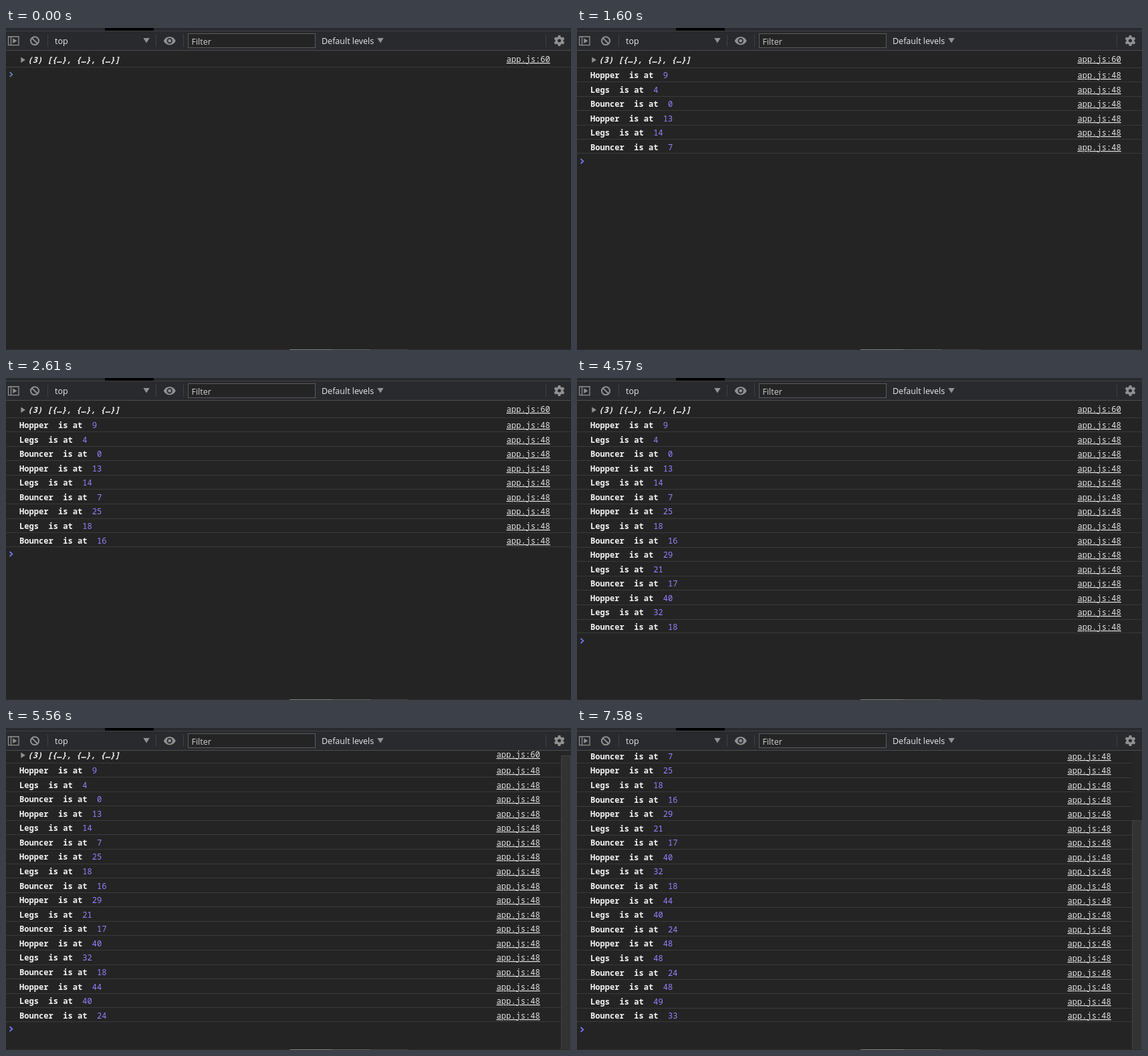
An HTML page for the animation above (8000 ms loop, 845 by 482 pixels).

```html
<!DOCTYPE html>
<html lang="en">
<head>
<meta charset="utf-8">
<title>Console race log</title>
<style>
  html, body { margin: 0; width: 100%; height: 100%; overflow: hidden; background: #242424; }
  svg { display: block; width: 845px; height: 482px; }
  text { white-space: pre; }
  #log { font: 600 12.1px "Noto Sans Mono", "DejaVu Sans Mono", monospace; fill: #f4f4f4; }
  #log .number { font-weight: 500; fill: #9980ff; }
  #log .link { font-weight: 500; fill: #e4e4e4; text-decoration: underline; }
  #log .preview { font-style: italic; }
  #log .rule { fill: #3a3a3a; }
  #bar { font: 12.5px "Open Sans", "Noto Sans", sans-serif; fill: #e8eaed; }
  .icon { fill: #919191; }
  .outline { fill: none; stroke: #919191; }
</style>
</head>
<body>
<svg viewBox="0 0 845 482">
  <rect width="845" height="482" fill="#242424"/>
  <g id="log"></g>

  <g id="scrollbar" shape-rendering="crispEdges">
    <rect x="830" y="34" width="15" height="448" fill="#262626"/>
    <rect id="thumb" x="830.5" width="14" fill="#333" stroke="#414141"/>
  </g>

  <g id="bar">
    <rect width="845" height="34" fill="#292a2d"/>
    <rect x="148" width="73" height="4" fill="#000"/>
    <rect y="4" width="845" height="1" fill="#3f4043"/>
    <rect y="33" width="845" height="1" fill="#4b4c4f"/>
    <path d="M62.5 10v18M224.5 10v18M265.5 10v18M807.5 10v18" stroke="#3f4043"/>

    <path class="outline" stroke-width="1.3" d="M3.5 13h15.5v12.6h-15.500zM7.500 13v12.600"/>
    <path class="icon" d="M10.300 15.500l6 3.800-6 3.800z"/>
    <g class="outline" stroke-width="2">
      <circle cx="43" cy="19.300" r="6"/>
      <path d="M38.800 15.100l8.400 8.400"/>
    </g>
    <path class="icon" d="M205.300 15h9.400l-4.700 7.500zM555.300 15h9.400l-4.700 7.500z"/>
    <path class="icon" d="M235.700 19.200C239.500 11 250 11 253.800 19.200C250 27.300 239.500 27.300 235.700 19.200z"/>
    <circle cx="244.700" cy="19.200" r="3.300" fill="#919191" stroke="#292a2d" stroke-width="1.800"/>

    <rect x="272.500" y="8.500" width="190" height="21" fill="#242424" stroke="#5b5b5b"/>
    <text x="73" y="24">top</text>
    <text x="277.500" y="25" fill="#d0d0d0">Filter</text>
    <text x="472" y="24">Default levels</text>

    <g id="gear" class="icon" transform="translate(827.500 19)">
      <circle r="4.300" fill="none" stroke="#919191" stroke-width="3.400"/>
    </g>
  </g>

  <g shape-rendering="crispEdges">
    <rect y="481" width="845" height="1" fill="#33292b"/>
    <rect x="424" y="481" width="64" height="1" fill="#858080"/>
    <rect x="488" y="481" width="57" height="1" fill="#666262"/>
    <rect x="545" y="481" width="57" height="1" fill="#474343"/>
  </g>
</svg>
<script>
  const NAMES = ["Hopper", "Legs", "Bouncer"];
  const POSITIONS = [9, 4, 0, 13, 14, 7, 25, 18, 16, 29, 21, 17,
                     40, 32, 18, 44, 40, 24, 48, 48, 24, 48, 49, 33];
  const TICKS = [610, 1600, 2610, 3620, 4570, 5560, 6570, 7580];
  const SCROLL = { 18: 7, 21: 71, 24: 136 };
  const LOOP = 8000, PITCH = 21.575, VIEW = 448;

  const $ = id => document.getElementById(id);
  const snap = (base, row, scroll) => Math.floor(base + PITCH * row) - scroll;

  const text = (x, y, content, name = "") =>
    `<text x="${x}" y="${y}" class="${name}">${content}</text>`;
  const rule = (y, width) =>
    `<rect class="rule" y="${y}" width="${width}" height="1"/>`;

  function drawLog(count) {
    const scroll = SCROLL[count] || 0;
    const width = scroll ? 830 : 845;
    const linkX = width - 96.500;
    const parts = [
      `<path class="icon" d="M22.300 ${43.500 - scroll}l6.700 4.300-6.700 4.300z"/>`,
      text(32.500, 52 - scroll, "(3) [{…}, {…}, {…}]", "preview"),
      text(linkX, 51 - scroll, "app.js:60", "link")
    ];
    for (let i = 0; i < count; i++) {
      const y = snap(75.5, i, scroll);
      const number = `<tspan class="number">${POSITIONS[i]}</tspan>`;
      parts.push(
        rule(snap(59.05, i, scroll), width),
        text(20, y, `${NAMES[i % 3]}  is at  ${number}`),
        text(linkX, y, "app.js:48", "link"));
    }
    const promptY = snap(69.6, count, scroll) + 0.5;
    parts.push(
      rule(snap(58.05, count, scroll), width),
      `<path d="M5.500 ${promptY - 3.5}l4 3.500-4 3.500" fill="none"
         stroke="${count ? "#6f78ee" : "#5f7bb5"}" stroke-width="1.700"/>`);
    $("log").innerHTML = parts.join("");

    $("scrollbar").style.display = scroll ? "" : "none";
    const offset = Math.round(scroll * VIEW / (VIEW + scroll));
    $("thumb").setAttribute("y", 34.5 + offset);
    $("thumb").setAttribute("height", VIEW - 1 - offset);
  }

  for (let angle = 0; angle < 360; angle += 60)
    $("gear").innerHTML += `<path d="M-2.200-5l.5-3h3.400l.5 3z" transform="rotate(${angle})"/>`;

  let shown = -1;
  function frame() {
    const time = performance.now() % LOOP;
    const count = 3 * TICKS.filter(tick => tick <= time).length;
    if (count !== shown) drawLog(shown = count);
    requestAnimationFrame(frame);
  }
  frame();
</script>
</body>
</html>
```
